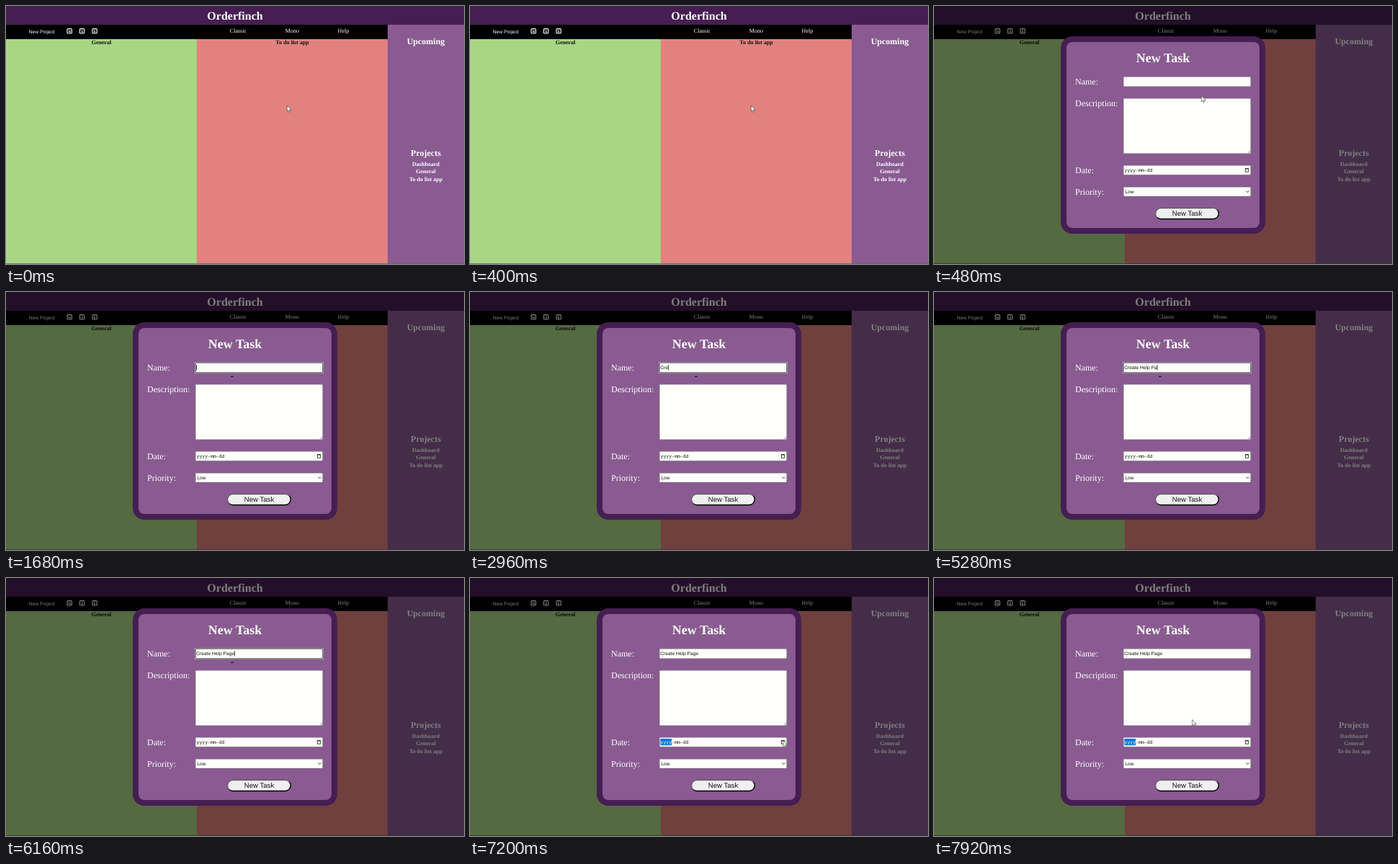
Animation of 636 by 358 pixels, one loop 8000 ms. Source, as an HTML page:

```html
<!DOCTYPE html>
<html lang="en">
<head>
<meta charset="utf-8">
<title>New task</title>
<style>
  html, body { margin: 0; width: 100%; height: 100%; overflow: hidden; background: #000; }
  svg { display: block; width: 636px; height: 358px; }
  text { font-family: "Liberation Serif", "Times New Roman", serif; font-size: 8px; fill: #fff; text-rendering: geometricPrecision; white-space: pre; }
  .mid { text-anchor: middle; }
  .bold { font-weight: 700; }
  .title { font-size: 16px; }
  .side { font-size: 12px; }
  .dark { fill: #111; }
  .sans { font: 6.667px "Liberation Sans", Arial, sans-serif; }
  .mono { font: 6.5px "Liberation Mono", monospace; }
  .label { font-size: 12px; }
  .field { fill: #fffffb; stroke: #767676; stroke-width: .5; }
  .icon rect { fill: none; stroke: #fff; stroke-width: 1.1; }
  .icon text { font: 700 5px "Liberation Sans", Arial, sans-serif; text-anchor: middle; }
</style>
</head>
<body>
<svg viewBox="0 0 636 358">
  <rect width="636" height="26" fill="#461e52"/>
  <rect y="26" width="530" height="20"/>
  <rect y="46" width="265" height="312" fill="#a9d683"/>
  <rect x="265" y="46" width="265" height="312" fill="#e2827f"/>
  <rect x="530" y="26" width="106" height="332" fill="#895b91"/>
  <rect y="357" width="636" height="1" fill="#666" opacity=".8"/>

  <text class="mid bold title" x="318" y="19">Orderfinch</text>
  <text class="sans" x="31.8" y="38">New Project</text>
  <g class="icon" transform="translate(88.2 34.8)"><rect x="-3.2" y="-3.2" width="6.4" height="6.4" rx="1"/><text y="1.8">N</text></g>
  <g class="icon" transform="translate(105.6 34.8)"><rect x="-3.2" y="-3.2" width="6.4" height="6.4" rx="1"/><text y="1.8">S</text></g>
  <g class="icon" transform="translate(123.1 34.8)"><rect x="-3.2" y="-3.2" width="6.4" height="6.4" rx="1"/><text y="1.8">E</text></g>
  <text class="mid" x="322.4" y="37.3">Classic</text>
  <text class="mid" x="397.4" y="37.3">Mono</text>
  <text class="mid" x="468.4" y="37.3">Help</text>
  <text class="mid bold dark" x="132.5" y="53">General</text>
  <text class="mid bold dark" x="397.7" y="53">To do list app</text>
  <text class="mid bold side" x="583" y="53">Upcoming</text>
  <text class="mid bold side" x="583" y="208">Projects</text>
  <text class="mid bold" x="583" y="221.7">Dashboard</text>
  <text class="mid bold" x="583" y="232.2">General</text>
  <text class="mid bold" x="583" y="242.7">To do list app</text>

  <g id="dialog">
    <rect width="636" height="358" opacity=".5"/>
    <rect x="176" y="42" width="284" height="274" rx="16" fill="#461e52"/>
    <rect x="184" y="50" width="268" height="258" rx="8" fill="#895b91"/>
    <text class="mid bold" x="318" y="78" style="font-size:18px">New Task</text>

    <text class="label" x="196" y="109">Name:</text>
    <text class="label" x="196" y="139">Description:</text>
    <text class="label" x="196" y="231.7">Date:</text>
    <text class="label" x="196" y="261.5">Priority:</text>

    <rect class="field" x="263.2" y="98.2" width="176.6" height="13.6" rx="1"/>
    <g id="ring">
      <rect x="262" y="97" width="179" height="16" rx="1.5" fill="#fff"/>
      <rect x="263" y="98" width="177" height="14" rx=".5" fill="#fffffb" stroke="#101010"/>
    </g>
    <text id="name" class="sans dark" x="264.2" y="106.9"></text>
    <rect id="caret" y="101" width=".7" height="7.6"/>

    <rect class="field" x="263.2" y="128.2" width="176.6" height="76.6" rx="1"/>
    <path d="M435.8 204l3.4-3.4M437.8 204l1.4-1.4" stroke="#555" stroke-width=".6"/>

    <rect class="field" x="263.2" y="221.2" width="176.6" height="13.1" rx="1"/>
    <rect id="mark" x="264.4" y="223" width="15.6" height="9.2" fill="#0078d7"/>
    <text class="mono dark" x="264.5" y="229.8"><tspan id="year">yyyy</tspan>-mm-dd</text>
    <path d="M432.3 225.4h4.4v4.8h-4.4zM432.3 226h4.4" fill="none" stroke="#111" stroke-width=".8"/>

    <rect class="field" x="263.2" y="251.2" width="176.6" height="12.9" rx="1"/>
    <text class="sans dark" x="265.4" y="260">Low</text>
    <path d="M433.6 256.6l2 2 2-2" fill="none" stroke="#111" stroke-width=".9"/>

    <rect x="307.7" y="280.6" width="87.6" height="15" rx="7.5" fill="#efefef" stroke="#4c4c4c" stroke-width="1"/>
    <path d="M393.2 282.7Q395.4 284.4 395.4 287.5A8 8 0 0 1 387.6 295.5H315.2Q312 295.5 309.9 293.4" fill="none" stroke="#000" stroke-width="1.3"/>
    <text class="mid dark" x="351.5" y="291.4" style="font:9.6px 'Liberation Sans',Arial,sans-serif">New Task</text>
  </g>

  <path id="arrow" d="M0 0V8.2L1.9 6.5 3.1 9.3 4.4 8.8 3.2 6H5.8Z" fill="#fff" stroke="#222" stroke-width=".55"/>
  <g id="beam">
    <rect x="-.3" y="-3.2" width=".7" height="1" fill="#999"/>
    <rect x="-2" y="3.7" width="4" height="1"/>
  </g>
</svg>
<script>
  const LOOP = 8000, STEP = 80;
  const TEXT = 'Create Help Page';
  // When each character of TEXT is typed.
  const KEYS = [2320, 2560, 2800, 3040, 3520, 3600, 3920, 4080, 4240, 4560, 4720, 4960, 5040, 5200, 5440, 5760];
  const OPEN = 480, FOCUS = 1360, BLUR = 7200, BLINK = 500;
  // Pointer path: time, x, y.
  const PATH = [
    [400, 390.4, 138], [480, 371.4, 124.6], [720, 326, 113.5], [880, 314, 113],
    [6560, 314, 113], [6880, 433, 221], [7120, 434, 224], [7200, 435, 225.5],
    [7600, 434, 225], [7920, 358.6, 196.6]
  ];

  const el = id => document.getElementById(id);
  const [dialog, ring, nameText, caret, mark, year, arrow, beam] =
    ['dialog', 'ring', 'name', 'caret', 'mark', 'year', 'arrow', 'beam'].map(el);
  const show = (node, on) => node.style.display = on ? '' : 'none';

  function pointer(t) {
    const i = PATH.findIndex(p => p[0] > t);
    if (i === 0) return PATH[0].slice(1);
    if (i < 0) return PATH[PATH.length - 1].slice(1);
    const [t0, x0, y0] = PATH[i - 1], [t1, x1, y1] = PATH[i];
    const k = (t - t0) / (t1 - t0);
    return [x0 + (x1 - x0) * k, y0 + (y1 - y0) * k];
  }

  function draw(t) {
    const typed = KEYS.filter(k => k <= t).length;
    const focused = t >= FOCUS && t < BLUR;
    const lastKey = typed ? KEYS[typed - 1] : FOCUS;
    const lit = Math.floor((t - lastKey) / BLINK) % 2 === 0;

    show(dialog, t >= OPEN);
    show(ring, focused);
    nameText.textContent = TEXT.slice(0, typed);
    const width = typed && t >= OPEN ? nameText.getComputedTextLength() : 0;
    caret.setAttribute('x', 264.2 + width);
    show(caret, focused && lit);
    show(mark, t >= BLUR);
    year.style.fill = t >= BLUR ? '#fff' : '';

    const [x, y] = pointer(t);
    const overName = t >= 720 && t < 6640;
    for (const node of [arrow, beam]) node.setAttribute('transform', `translate(${x} ${y})`);
    show(arrow, !overName);
    show(beam, overName);
  }

  const start = performance.now();
  function tick() {
    const t = (performance.now() - start) % LOOP;
    draw(Math.floor(t / STEP) * STEP);
    requestAnimationFrame(tick);
  }
  tick();
</script>
</body>
</html>
```
